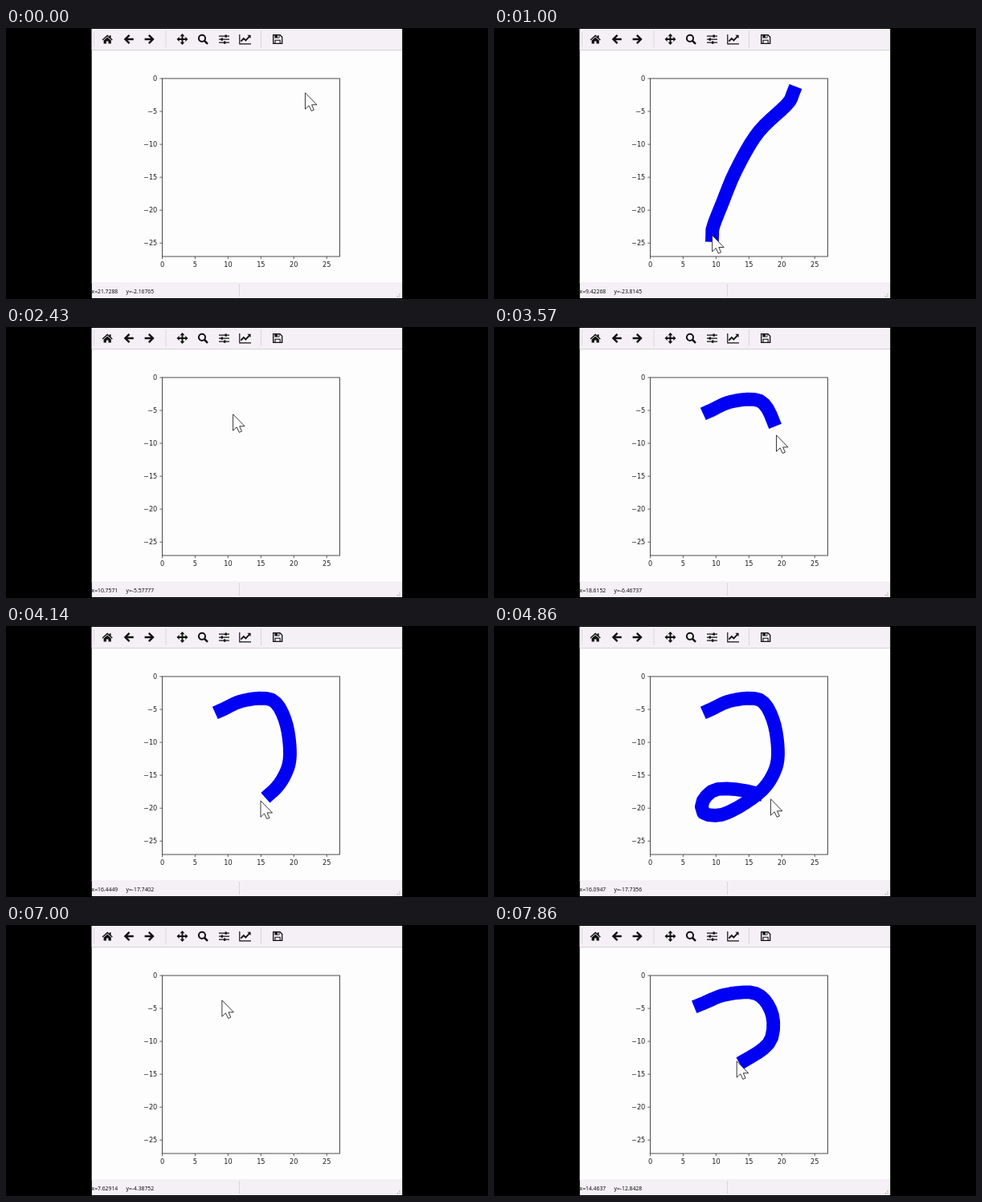
An HTML page for the animation above (8 s loop, 600x338 px).

```html
<!DOCTYPE html>
<html lang="en">
<head>
<meta charset="utf-8">
<title>Digit drawing</title>
<style>
  html, body { margin: 0; width: 100%; height: 100%; overflow: hidden; background: #000; }
  svg { display: block; width: 100vw; height: 100vh; }
  .tick { font: 8.2px "DejaVu Sans", sans-serif; fill: #1c1c1c; }
  .status { font: 6.8px "Open Sans", sans-serif; fill: #000; }
  #digit { font: 33px "DejaVu Sans", sans-serif; fill: #e00a14; text-anchor: middle; }
  #ink { fill: none; stroke: #0000f4; stroke-width: 16.8; stroke-linecap: square; stroke-linejoin: round; }
  .line { fill: none; stroke: #111; }
</style>
</head>
<body>
<svg viewBox="0 0 600 338" preserveAspectRatio="none">
  <rect width="600" height="338" fill="#000"/>
  <rect x="106.7" y="1" width="386.5" height="336" fill="#fefdfe"/>
  <rect x="106.7" y="1" width="386.3" height="26.5" fill="#f4f0f5"/>
  <path d="M106.7 27.7H493" stroke="#c9c6ca" stroke-width=".8"/>
  <rect x="106.7" y="317" width="386.3" height="20" fill="#f4f0f5"/>
  <path d="M290.5 319V335M199 3V24M317.5 3V24" stroke="#d6d3d8" stroke-width=".9"/>
  <path d="M109.5 5V24" stroke="#c4c1c6" stroke-dasharray="1 1.4"/>
  <path d="M490 331.5v5M487.5 334v2.5" stroke="#a09da3" stroke-width="1.2" stroke-dasharray="1.2 1.2"/>

  <g id="icons" fill="#111">
    <path d="M126.2 8.6 119.6 14.4l.9 1 5.7-5 5.7 5 .9-1-2.2-2V9.2h-1.8v1.6z"/>
    <path d="M126.2 11.6 121.6 15.6v4h3.3v-3h2.6v3h3.3v-4z"/>
    <g class="line" stroke-width="2.4">
      <path d="M148.5 14H158.8M153.6 8.8 148.4 14l5.2 5.2"/>
      <path d="M172.6 14H183M177.8 8.8 183 14l-5.2 5.2"/>
    </g>
    <path class="line" stroke-width="1.9" d="M219.5 9V19M214.5 14H224.5"/>
    <path d="M219.5 7l2.9 3.2h-5.8zM219.5 21l2.9-3.2h-5.8zM212.5 14l3.2-2.9v5.8zM226.5 14l-3.2-2.9v5.8z"/>
    <circle class="line" cx="244" cy="12.8" r="4.1" stroke-width="2"/>
    <path class="line" stroke-width="2.6" d="M247 15.8 251 19.8"/>
    <path class="line" stroke-width="1.3" d="M265 10.2H278M265 14.2H278M265 18.2H278"/>
    <path d="M272.5 8.6h2.4v3.2h-2.4zM267.6 12.6h2.4v3.2h-2.4zM271 16.6h2.4v3.2H271z"/>
    <path class="line" stroke-width="1.2" d="M290.8 8V19.8H305"/>
    <path class="line" stroke-width="1.9" d="M292.4 16.6 295.8 13l2.6 2.4 4.6-4.8"/>
    <path d="M300.4 8.8h4.2v4.2z"/>
    <path class="line" stroke-width="1.3" d="M332.7 8.7h8.4l2.6 2.6v8h-11z"/>
    <path d="M334.4 8.5h6v4h-6z"/>
    <path class="line" stroke-width="1.1" d="M335 19v-3.8h6.2V19"/>
    <path d="M338 9.3h1.5v2.4H338z" fill="#f4f0f5"/>
  </g>

  <path id="ink"/>
  <rect x="194.5" y="63" width="221" height="222" fill="none" stroke="#3a3a3a" stroke-width=".9"/>
  <g id="ticks"></g>
  <text id="digit" x="304.7" y="57.8"></text>
  <text id="sx" class="status" x="106.6" y="331"></text>
  <text id="sy" class="status" x="149.5" y="331"></text>
  <rect y="318" width="106.7" height="20" fill="#000"/>
  <path id="cursor" d="M0 0V20.4L4.6 16l3.1 6.6 3.2-1.3L8.1 15h6.4z" fill="#fff" stroke="#222" stroke-width=".9"/>
</svg>
<script>
const LOOP = 8000, STEPS = 56;
const LEAD = 0.6;   // the pointer runs ahead of the ink by this many steps
const $ = id => document.getElementById(id);
const px = x => 194.5 + x * 8.19;
const py = y => 63 - y * 8.21;

// Key points are [step, x, y] in axis units, joined by a smooth curve.
const one = [
  [.7, 21.7288, -2.16765], [1.6, 20.9, -3.8], [3, 16.4, -8.2], [4.4, 13, -14],
  [5.6, 10.8, -19.3], [6.6, 9.5, -22.7], [7, 9.42268, -23.8145]
];
const two = [
  [21, 8.97143, -5.11628], [22.9, 12.6, -3.6], [24, 16.66, -3.55], [25, 18.6152, -6.46737],
  [26.2, 19.4, -11], [27.4, 18.95, -14.25], [28.9, 16.67, -17.55], [30.9, 11.2, -20.9],
  [31.7, 8.2, -20.8], [32.2, 7.95, -19], [33, 10.3, -17.1], [34, 16.0947, -17.7356],
  [36, 22.6473, -20.9518]
];
const three = [
  [49, 7.62914, -4.38752], [50.6, 11.7, -2.85], [51.8, 16.2, -2.8], [53, 18.55, -6],
  [53.9, 18.2, -10], [55, 14.4637, -12.8428], [55.6, 13.15, -13]
];

const first = a => a[0];
const last = a => a[a.length - 1];
const spot = (p, step) => [step, p[1], p[2]];
const rest1 = [11, 17.3841, -14.2536], rest2 = [38, 17.7866, -15.4625];

const phases = [
  { pts: one, label: "1", clear: 15 },
  { pts: [spot(last(one), 8), rest1] },
  { pts: [spot(rest1, 13), [17, 10.7571, -5.57777], spot(first(two), 19)] },
  { pts: two, label: "2", clear: 43 },
  { pts: [last(two), rest2] },
  { pts: [spot(rest2, 40), [42, 17.2808, -15.2151], spot(first(three), 47)] },
  { pts: three, label: "3", clear: STEPS }
];

// Hermite curve whose tangents come from the neighbouring key points.
function at(pts, k) {
  const n = pts.length - 1;
  const t = Math.min(Math.max(k, pts[0][0]), pts[n][0]);
  const i = Math.max(1, pts.findIndex(p => p[0] >= t));
  const a = pts[i - 1], b = pts[i], d = b[0] - a[0], f = (t - a[0]) / d;
  const slope = (j, c) => {
    const p = pts[Math.max(j - 1, 0)], q = pts[Math.min(j + 1, n)];
    return (q[c] - p[c]) / (q[0] - p[0]);
  };
  return [1, 2].map(c => {
    const s = f * f * (3 - 2 * f);
    const bend = f * (1 - f) * ((1 - f) * slope(i - 1, c) - f * slope(i, c));
    return a[c] + (b[c] - a[c]) * s + d * bend;
  });
}

function inkPath(pts, k) {
  const from = pts[0][0], to = Math.min(k, last(pts)[0]), line = [];
  if (to <= from) return "";
  for (let t = from; t < to; t += 0.25) line.push(at(pts, t));
  line.push(at(pts, to));
  return "M" + line.map(([x, y]) => `${px(x)} ${py(y)}`).join("L");
}

const six = v => String(+v.toPrecision(6));

function draw(k) {
  const phase = phases.filter(p => p.pts[0][0] <= k).pop() || phases[0];
  const [cx, cy] = at(phase.pts, phase.label ? k + LEAD : k);
  const [x, y] = at(phase.pts, k);
  $("cursor").setAttribute("transform", `translate(${px(cx)} ${py(cy)})`);
  $("sx").textContent = "x=" + six(x);
  $("sy").textContent = "y=" + six(y);

  const stroke = phases.find(p => p.label && k >= p.pts[0][0] && k < p.clear);
  $("ink").setAttribute("d", stroke ? inkPath(stroke.pts, k) : "");
  $("digit").textContent = stroke && k > last(stroke.pts)[0] ? stroke.label : "";
}

function ticks() {
  let out = "";
  for (let v = 0; v <= 25; v += 5) {
    const x = px(v), y = py(-v);
    out += `<path d="M${x} 285v3.2M194.5 ${y}h-3.2" stroke="#3a3a3a" stroke-width=".8"/>
      <text class="tick" x="${x}" y="297.7" text-anchor="middle">${v}</text>
      <text class="tick" x="188.3" y="${y + 3}" text-anchor="end">${v ? "\u2212" + v : 0}</text>`;
  }
  $("ticks").innerHTML = out;
}

let shown = -1;
function frame(now) {
  // Small offset absorbs the rounding of step times to 10 ms.
  const k = Math.floor(((now - start + 3) % LOOP) / LOOP * STEPS);
  if (k !== shown) draw(shown = k);
  requestAnimationFrame(frame);
}

ticks();
draw(0);
const start = performance.now();
requestAnimationFrame(t => frame(Math.max(t, start)));
</script>
</body>
</html>
```
